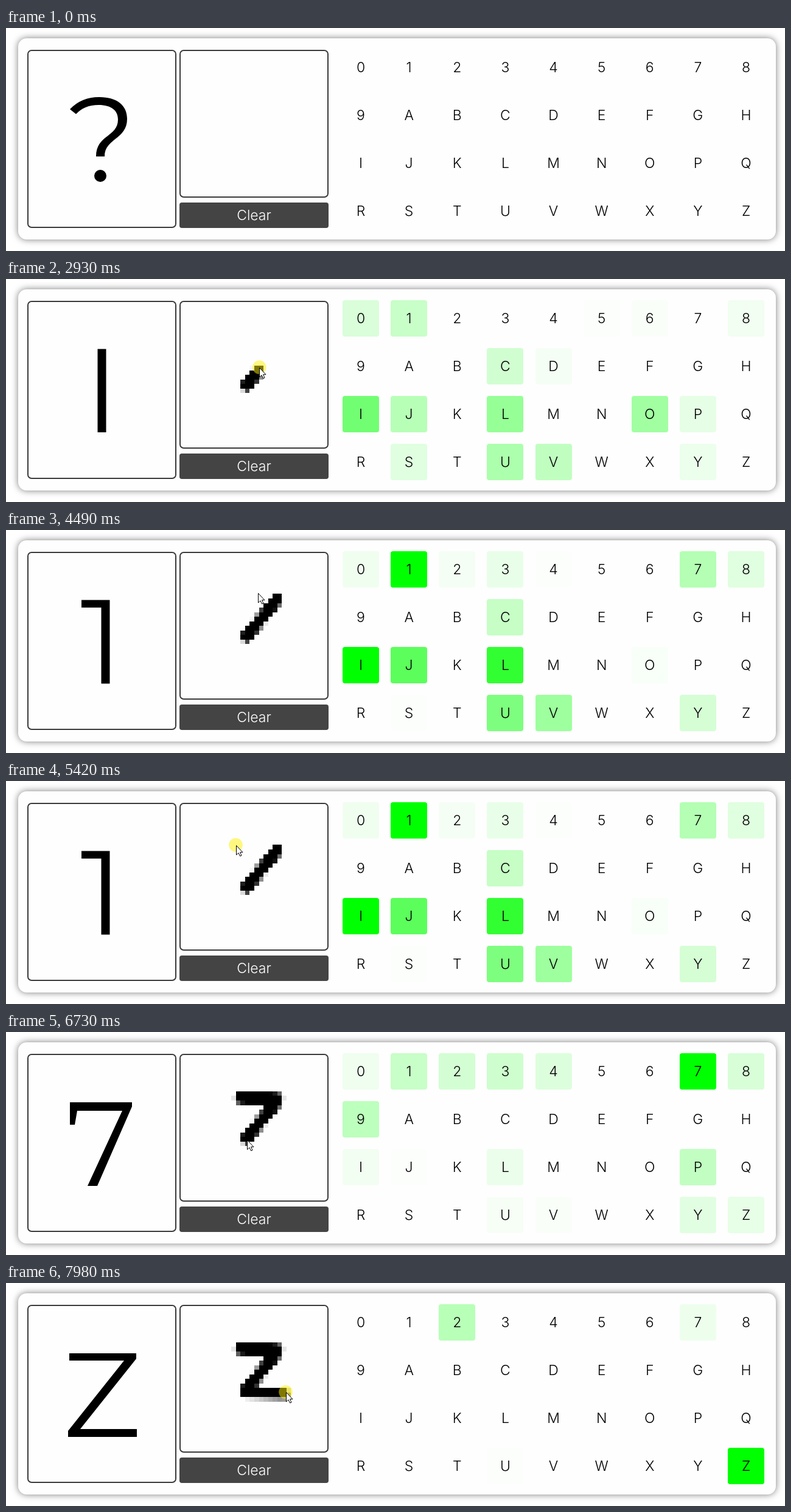
Animation of 1280x368 px, one loop 8 s. Source, as an HTML page with a canvas:

```html
<!DOCTYPE html>
<html lang="en">
<head>
<meta charset="utf-8">
<title>Handwriting recognition</title>
<style>
  html, body { margin: 0; width: 1280px; height: 368px; overflow: hidden; background: #fff; }
  body { position: relative; font: 300 23px Inter, "Open Sans", sans-serif; color: #000; }
  body * { position: absolute; box-sizing: border-box; }
  .card { left: 20px; top: 17px; width: 1245px; height: 332px; border-radius: 14px;
    background: #fefefe; box-shadow: 0 0 12px rgba(0, 0, 0, .52); }
  .frame { top: 36px; width: 245px; border: 2px solid #3a3a3a; border-radius: 7px; }
  .guess { left: 35px; height: 294px; }
  .pad { left: 285px; height: 244px; }
  .clear { left: 285px; top: 288px; width: 245px; height: 42px; border-radius: 4px;
    background: #444; color: #fff; text-align: center; line-height: 42px; }
  .cell { width: 60px; height: 60px; border-radius: 4px; text-align: center; line-height: 60px; }
  svg, canvas { left: 0; top: 0; }
</style>
</head>
<body>
<div class="card"></div>
<div class="frame guess"></div>
<div class="frame pad"></div>
<div class="clear">Clear</div>
<svg width="1280" height="368"><path id="glyph"/></svg>
<canvas width="1280" height="368"></canvas>
<script>
const LOOP = 8000, STEP = 78, EASE = 1.15;
const SYMBOLS = [...'0123456789ABCDEFGHIJKLMNOPQRSTUVWXYZ'];
const CELL = 7.53, PAD_X = 287.5, PAD_Y = 37.7;

const GLYPHS = {
  '?': 'M105 134 Q124 114 153 114 C183 114 199 128 199 150 C199 184 162 182 162 212 H148 ' +
       'C148 176 184 180 184 151 C184 136 173 127 152 127 Q129 127 115 142Z ' +
       'M145 244 a10 10 0 1 0 20 0 a10 10 0 1 0 -20 0',
  I: 'M150.5 115.5 H164.5 V253 H150.5Z',
  1: 'M124 115.5 H170.5 V253.5 H156.5 V128 H124Z',
  7: 'M105 116 H207 V123 L150 254 H134 L191 130 H117 L113 153 H105Z',
  Z: 'M104 116 H214 V125 L122 241 H215 V254 H102 V244 L194 128 H104Z'
};
const guesses = [[0, '?'], [2620, 'I'], [3400, '1'], [5640, '7'], [7740, 'Z']];

// The best symbol scores 1; the rest fall from `second` towards 0 in rank order.
function ranking(order, second, power) {
  const n = order.length - 1;
  return SYMBOLS.map(symbol => {
    const rank = order.indexOf(symbol);
    return rank < 1 ? rank + 1 : second * (1 - (rank - 1) / n) ** power;
  });
}
const scores = [
  [2620, 3330, ranking('ILOUJV1C0SPY8D65Z', .75, 1.8)],
  [3400, 3400, ranking('1ILJUV7CY8302OS4DPZ659', 1, 4.5)],
  [5570, 5800, ranking('7LIZ21UJYV349P80CO', .78, 1.7)],
  [5880, 6040, ranking('79P13284YZL0IUVJ5', .26, 1.5)],
  [7510, 7980, ranking('Z27U3', .28, 5)]
];

// Pointer: first step, last step, place reached.
const moves = [
  [300, 930, [382, 152]], [1310, 1460, [389, 152]], [1920, 2470, [390, 178]],
  [2620, 3480, [447, 108]], [4180, 4960, [381, 101]], [5050, 5270, [377.5, 105.5]],
  [5570, 6040, [450.5, 108.5]], [6270, 6730, [396, 178]], [6900, 7130, [386, 178.5]],
  [7510, 7980, [459.5, 180]]
];
const presses = [[2620, 3860], [5420, 6270], [7360, LOOP]];

const clamp = v => Math.max(0, Math.min(1, v));
const mix = (a, b, p) => a.map((v, i) => v + (b[i] - v) * p);

function track(t, value, changes) {
  for (const [first, last, goal] of changes) {
    if (t < first) break;
    const count = Math.round((last - first) / STEP) + 1;
    const done = Math.min(count, Math.floor((t - first) / STEP + .1) + 1) / count;
    value = mix(value, goal, 1 - (1 - done) ** EASE);
  }
  return value;
}
const pointerAt = t => track(t, [1224, 386], moves);

const cells = SYMBOLS.map((symbol, i) => {
  const cell = document.createElement('div');
  cell.className = 'cell';
  cell.textContent = symbol;
  cell.style.left = 553 + i % 9 * 79.13 + 'px';
  cell.style.top = 35 + Math.floor(i / 9) * 79 + 'px';
  document.body.insertBefore(cell, document.querySelector('svg'));
  return cell;
});
const glyph = document.getElementById('glyph');
const ctx = document.querySelector('canvas').getContext('2d');
const arrow = new Path2D('M.5 .5 V16 L4 12.7 L6.6 18 L9 17 L6.6 11.7 H11Z');

function distance(x, y, [ax, ay], [bx, by]) {
  const dx = bx - ax, dy = by - ay;
  const p = clamp(((x - ax) * dx + (y - ay) * dy) / (dx * dx + dy * dy || 1));
  return Math.hypot(x - ax - dx * p, y - ay - dy * p);
}

// The pen line in pad cells, a little shorter than the pointer's path.
function penLine(t, [down, up]) {
  const [a, b] = [down - 1, Math.min(t, up - 1)].map(pointerAt)
    .map(([x, y]) => [(x - PAD_X) / CELL + .2, (y - PAD_Y) / CELL + .3]);
  const inset = Math.min(.5, .8 / (Math.hypot(b[0] - a[0], b[1] - a[1]) || 1));
  return [mix(a, b, inset), mix(b, a, inset)];
}

function drawInk(t) {
  const lines = presses.filter(([down]) => t >= down + STEP).map(press => penLine(t, press));
  for (let row = 0; row < 32; row++) for (let col = 0; col < 32; col++) {
    let paper = 1;
    for (const [a, b] of lines)
      paper *= 1 - clamp((1.5 - distance(col + .5, row + .5, a, b)) / .4);
    if (paper > .99) continue;
    const x = Math.round(PAD_X + col * CELL), y = Math.round(PAD_Y + row * CELL);
    ctx.fillStyle = `rgba(0,0,0,${1 - paper})`;
    ctx.fillRect(x, y, Math.round(PAD_X + (col + 1) * CELL) - x,
      Math.round(PAD_Y + (row + 1) * CELL) - y);
  }
}

function drawPointer(t) {
  const [x, y] = pointerAt(t);
  if (presses.some(([down, up]) => t >= down && t < up)) {
    ctx.fillStyle = 'rgba(255,240,0,.5)';
    ctx.beginPath();
    ctx.arc(x, y, 11.3, 0, 7);
    ctx.fill();
  }
  ctx.save();
  ctx.translate(Math.round(x), Math.round(y));
  ctx.fillStyle = '#fff';
  ctx.fill(arrow);
  ctx.stroke(arrow);
  ctx.restore();
}

function draw(t) {
  const score = track(t, SYMBOLS.map(() => 0), scores);
  cells.forEach((cell, i) => { cell.style.background = `rgba(0,255,0,${score[i].toFixed(3)})`; });
  glyph.setAttribute('d', GLYPHS[guesses.filter(([start]) => t >= start).pop()[1]]);
  ctx.clearRect(0, 0, 1280, 368);
  drawInk(t);
  drawPointer(t);
}

const begin = performance.now();
(function frame() {
  draw((performance.now() - begin) % LOOP);
  requestAnimationFrame(frame);
})();
</script>
</body>
</html>
```
